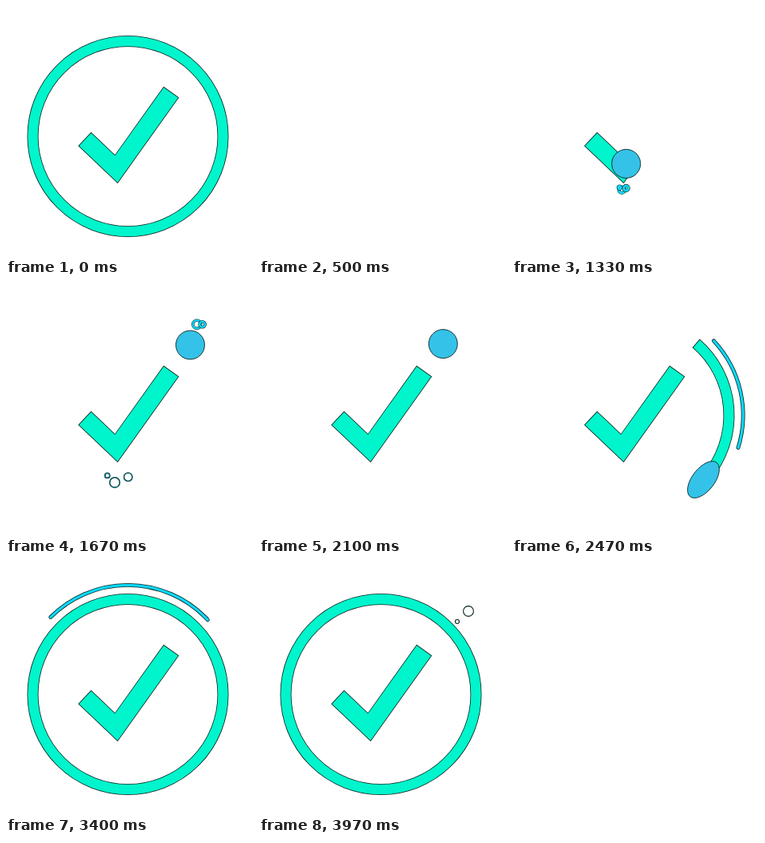
An HTML page with a canvas that plays this animation: 309 px wide and 314 px high, repeating every 4010 ms.

```html
<!DOCTYPE html>
<html lang="en">
<head>
<meta charset="utf-8">
<title>Check mark</title>
<style>
  html, body { margin: 0; width: 100%; height: 100%; overflow: hidden; background: #fff; }
  canvas { display: block; }
</style>
</head>
<body>
<canvas id="stage" width="309" height="314"></canvas>
<script>
const ctx = document.getElementById('stage').getContext('2d');
const LOOP = 4010, STEP = 100 / 3;
const GREEN = '#00f5cc', BLUE = '#35c2e8', CYAN = '#0cd8fa', DARK = '#06241f';
const CX = 152.5, CY = 163, RING = 119, TRAIL = 136.6, START = -49;
const A = [98.7, 166.7], B = [138, 204], C = [206.5, 108];

const linear = p => p;
const easeIn = p => p ** 3;
const easeOut = p => 1 - (1 - p) ** 3;
const easeBoth = p => p * p * (3 - 2 * p);
const rad = deg => deg * Math.PI / 180;

// Keys are [time, value, easing into this key]; values are numbers or points.
function track(keys, t) {
  const i = keys.findIndex(k => k[0] > t);
  if (i === 0) return keys[0][1];
  if (i < 0) return keys[keys.length - 1][1];
  const [t0, v0] = keys[i - 1], [t1, v1, ease = linear] = keys[i];
  const p = ease((t - t0) / (t1 - t0));
  const mix = (a, b) => a + (b - a) * p;
  return Array.isArray(v0) ? v0.map((v, n) => mix(v, v1[n])) : mix(v0, v1);
}

const HOP = [
  [600, [-20, 64]], [850, [31, 65], easeOut], [1000, [37, 73], easeIn],
  [1067, [61, 108]], [1150, A], [1233, B, easeOut], [1300, B],
  [1533, [224, 84], easeBoth], [1600, [230.5, 75], easeOut]
];
const TURN = [[2070, START], [2467, 43, easeIn], [2600, 133], [2870, 311]];
const STRETCH = [[2200, 0], [2467, 1, easeIn], [2750, 1], [2870, 0]];
const SIZE = [[2830, 18], [2933, 6], [2970, 0]];
const HEAD = [[2330, -43], [2467, 17.4], [2933, 198], [3300, 317, easeOut]];
const TAIL = [[2467, -43], [2933, 56, p => p ** 1.4], [3133, 118], [3630, 317]];

// start, life, origin x/y, drift x/y, radius
const BUBBLES = [
  [800, 330, 36, 74, -8, -5.5, 4.8], [800, 330, 36, 74, 3.5, -11.5, 3.3],
  [1270, 530, 138, 222, -2, 25.5, 6.3], [1270, 530, 138, 222, 15, 18.5, 5.2],
  [1270, 560, 138, 222, -11.5, 16.8, 3],
  [1567, 500, 232, 58, 14, -18, 5], [1567, 500, 232, 58, 28, -18, 3.5],
  [3560, 445, 236, 70, 26, -11, 6.4], [3560, 445, 236, 70, 12, 2, 2.5]
];

function stroke(color, width, cap = 'butt') {
  ctx.strokeStyle = color;
  ctx.lineWidth = width;
  ctx.lineCap = cap;
  ctx.stroke();
}

function drawCheck(ball, t) {
  if (t <= 1150) return;
  const tip = t > 1600 || ball[0] > C[0] ? C : ball;
  for (const [color, width, grow] of [[DARK, 23.6, .5], [GREEN, 22, -.4]]) {
    ctx.beginPath();
    ctx.moveTo(A[0] - grow * .73, A[1] - grow * .69);
    if (t > 1300) {
      ctx.lineTo(...B);
      ctx.lineTo(tip[0] + grow * .58, tip[1] - grow * .81);
    } else {
      ctx.lineTo(...tip);
    }
    stroke(color, width);
  }
}

function drawRing(end) {
  if (end <= START) return;
  for (const [color, width, grow] of [[DARK, 14, .25], [GREEN, 12.4, -.2]]) {
    const full = end >= 311;
    const from = full ? 0 : START - grow, to = full ? 360 : end + grow;
    if (to <= from) continue;
    ctx.beginPath();
    ctx.arc(CX, CY, RING, rad(from), rad(to));
    stroke(color, width);
  }
}

function drawTrail(t) {
  const from = track(TAIL, t), to = track(HEAD, t);
  if (to - from < .2) return;
  ctx.beginPath();
  ctx.arc(CX, CY, TRAIL, rad(from), rad(to));
  stroke(DARK, 4.8, 'round');
  stroke(CYAN, 3.2, 'round');
}

function drawBall(x, y, rx, ry, angle) {
  if (rx <= 0) return;
  ctx.beginPath();
  ctx.ellipse(x, y, rx, ry, angle, 0, Math.PI * 2);
  ctx.fillStyle = BLUE;
  ctx.fill();
  if (rx > 10) stroke(DARK, .9);
}

function drawBubble([start, life, x, y, dx, dy, r], t) {
  const p = (t - start) / life;
  if (p <= 0 || p >= 1) return;
  const e = easeOut(p), w = Math.max(0, 3.2 * (1 - p * 1.15));
  ctx.beginPath();
  ctx.arc(x + dx * e, y + dy * e, r * Math.min(1, p * 5), 0, Math.PI * 2);
  stroke(DARK, w + 1.1);
  if (w > 0) stroke(CYAN, w);
}

function draw(t) {
  ctx.clearRect(0, 0, 309, 314);
  if (t < 500) {
    drawCheck(C, LOOP);
    drawRing(311);
    return;
  }
  if (t < 600) return;
  const turn = track(TURN, t), s = track(STRETCH, t), size = track(SIZE, t);
  const hop = track(HOP, t);
  drawCheck(hop, t);
  drawRing(turn);
  drawTrail(t);
  BUBBLES.forEach(b => drawBubble(b, t));
  const [x, y] = t < 2070 ? hop
    : [CX + 118.5 * Math.cos(rad(turn)), CY + 118.5 * Math.sin(rad(turn))];
  drawBall(x, y, size + 9 * s, size - 4 * s, rad(turn + 85));
}

const begin = performance.now();
function tick() {
  const t = (performance.now() - begin) % LOOP;
  draw(t < 600 ? t : Math.floor((t + 4) / STEP) * STEP + .01);
  requestAnimationFrame(tick);
}
tick();
</script>
</body>
</html>
```
